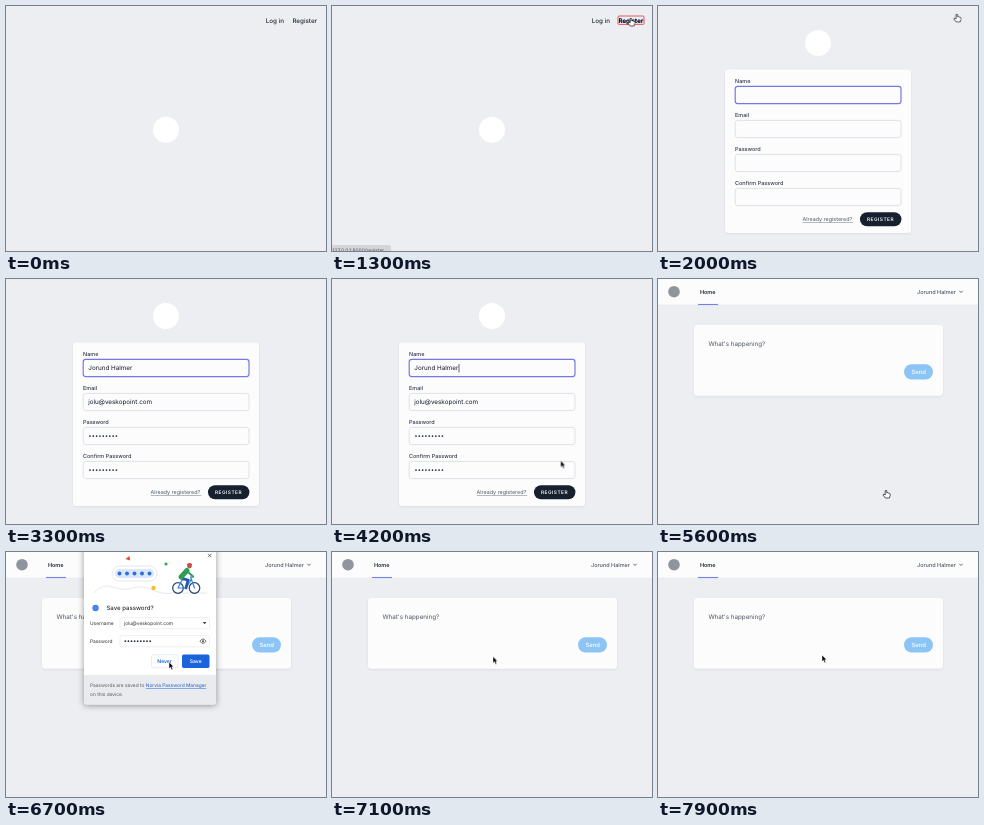
An HTML page that plays this animation: 320 by 245 pixels, repeating every 8 s.

```html
<!DOCTYPE html>
<html lang="en">
<head>
<meta charset="utf-8">
<title>Sign up</title>
<style>
html, body { margin: 0; width: 100%; height: 100%; overflow: hidden; background: #edeef2; }
svg { display: block; width: 320px; height: 245px; font-family: Inter, "Open Sans", sans-serif; fill: #1f2937; text-rendering: geometricPrecision; }

.semi { font-weight: 600; }
.medium { font-weight: 500; }
.nav { font-size: 6.25px; }
.label { font-size: 5.5px; font-weight: 500; fill: #303a49; }
.value { font-size: 6.3px; fill: #111827; }
.dialog-text { font-size: 4.85px; fill: #2c2f34; }
.surface { fill: #fcfcfd; }
.card { filter: drop-shadow(0 1px 1px #0001); }
.field { fill: #fcfcfd; stroke: #d3d7dd; stroke-width: .7; }
.dots { fill: none; stroke: #1f2937; stroke-width: 1.75; stroke-linecap: round; }

/* One loop is 8 s, so 1.25% is 100 ms. */
.cut, .fade, #pointer, #button { animation: 8s infinite both; }
.cut { animation-timing-function: step-end; }
.fade { animation-timing-function: linear; }

#welcome { animation-name: welcome; }
#register { animation-name: register; }
#home { animation-name: home; }
#ring { animation-name: ring; }
#status { animation-name: status; }
#first-caret { animation-name: first-caret; }
#caret { animation-name: caret; }
#filled { animation-name: filled; }
#button { animation-name: button; animation-timing-function: linear; }
#dialog { animation-name: dialog; }
#pointer { animation-name: move; animation-timing-function: ease-in-out; }
#shown { animation-name: shown; }
#arrow { animation-name: arrow; }
#hand { animation-name: hand; }

@keyframes welcome { 0% { opacity: 1 } 18.75%, 100% { opacity: 0 } }
@keyframes register { 0% { opacity: 0 } 18.75% { opacity: 1 } 66.25%, 100% { opacity: 0 } }
@keyframes home { 0% { opacity: 0 } 66.25%, 100% { opacity: 1 } }
@keyframes ring { 0% { opacity: 0 } 16.2%, 100% { opacity: 1 } }
@keyframes status { 0%, 14.5% { opacity: 0 } 16.25%, 100% { opacity: 1 } }
@keyframes first-caret { 0% { opacity: 1 } 25%, 100% { opacity: 0 } }
@keyframes caret {
  0% { opacity: 0 } 37.5% { opacity: 1 } 41.2% { opacity: 0 } 47.5% { opacity: 1 }
  53.75% { opacity: 0 } 60%, 100% { opacity: 1 }
}
@keyframes filled { 0% { opacity: 0 } 35%, 100% { opacity: 1 } }
@keyframes button { 0%, 58.75% { fill: #17202f } 60.6%, 100% { fill: #2c3545 } }
@keyframes dialog { 0%, 72% { opacity: 0 } 76.25%, 86% { opacity: 1 } 88.75%, 100% { opacity: 0 } }
@keyframes move {
  0%, 3.75% { transform: translate(220px, 213px) }
  13.75%, 23% { transform: translate(298.7px, 12px) }
  30%, 44% { transform: translate(299px, -12px) }
  44.1%, 45% { transform: translate(240px, 15px) }
  55%, 57.5% { transform: translate(227px, 206px) }
  58.75%, 78% { transform: translate(228px, 211px) }
  82.5%, 86.5% { transform: translate(163px, 110px) }
  88.75%, 98.65% { transform: translate(161px, 104.5px) }
  98.7%, 100% { transform: translate(164px, 103px) }
}
@keyframes shown { 0% { opacity: 0 } 3.75% { opacity: 1 } 30% { opacity: 0 } 45%, 100% { opacity: 1 } }
@keyframes arrow { 0% { opacity: 1 } 15% { opacity: 0 } 30% { opacity: 1 } 58.75% { opacity: 0 } 78.75%, 100% { opacity: 1 } }
@keyframes hand { 0% { opacity: 0 } 15% { opacity: 1 } 30% { opacity: 0 } 58.75% { opacity: 1 } 78.75%, 100% { opacity: 0 } }
</style>
</head>
<body>
<svg viewBox="0 0 320 245">
  <g id="welcome" class="cut">
    <g class="nav medium">
      <text x="259.8" y="16.5">Log in</text>
      <text x="286.4" y="16.5">Register</text>
    </g>
    <circle cx="160" cy="123.7" r="13" fill="#fff"/>
    <g id="ring" class="cut">
      <rect x="286" y="10" width="26" height="8.4" rx="1" fill="none" stroke="#e8474a" stroke-width=".9"/>
      <text class="nav semi" x="286.4" y="16.5" fill="#111827">Register</text>
    </g>
    <g id="status" class="fade">
      <path d="M0 239h57q2 0 2 2v4H0z" fill="#d3d5d8"/>
      <text x=".5" y="246" font-size="4.9" fill="#50555c">127.0.0.1:8000/register</text>
    </g>
  </g>

  <g id="register" class="cut">
    <circle cx="160" cy="37" r="13" fill="#fff"/>
    <rect class="surface card" x="67" y="63.5" width="186" height="163.5" rx="3.5"/>
    <g class="label">
      <text x="77" y="76.6">Name</text>
      <text x="77" y="110.6">Email</text>
      <text x="77" y="144.6">Password</text>
      <text x="77" y="178.6">Confirm Password</text>
    </g>
    <g class="field">
      <rect x="77.2" y="80.4" width="165.8" height="17.2" rx="2.5" style="stroke:#7577e6;stroke-width:1.2"/>
      <rect x="77.2" y="114.4" width="165.8" height="17.2" rx="2.5"/>
      <rect x="77.2" y="148.4" width="165.8" height="17.2" rx="2.5"/>
      <rect x="77.2" y="182.4" width="165.8" height="17.2" rx="2.5"/>
    </g>
    <path id="first-caret" class="cut" d="M82.6 85v8.5" stroke="#1f2937" stroke-width=".7"/>
    <g id="filled" class="cut">
      <g class="value">
        <text x="82.3" y="91.3">Jorund Halmer</text>
        <text x="82.3" y="125.3">jolu@veskopoint.com</text>
      </g>
      <path class="dots" stroke-dasharray="0 3.3" d="M84 157h26.6M84 191h26.6"/>
    </g>
    <path id="caret" class="cut" d="M127 85v8.5" stroke="#1f2937" stroke-width=".7"/>
    <text x="144.6" y="215.4" font-size="5.4" fill="#505866">Already registered?</text>
    <path d="M144.6 216.5h50.6" stroke="#6b7280" stroke-width=".5"/>
    <rect id="button" x="202" y="206.3" width="41.4" height="14" rx="7"/>
    <text class="semi" x="209" y="215.1" font-size="4.8" letter-spacing=".48" fill="#f5f6f8">REGISTER</text>
  </g>

  <g id="home" class="cut">
    <rect class="surface" width="320" height="26"/>
    <path d="M0 26h320" stroke="#e6e8ec" stroke-width=".6"/>
    <circle cx="16" cy="12.7" r="5.8" fill="#8f949d"/>
    <text class="semi" x="41.9" y="15" font-size="5.5">Home</text>
    <path d="M40 25.5h20" stroke="#7482e6" stroke-width="1.1"/>
    <text class="medium" x="259" y="14.6" font-size="5.5" fill="#4f5765">Jorund Halmer</text>
    <path d="M301.3 11.8l1.7 1.7 1.7-1.7" fill="none" stroke="#4f5765" stroke-width=".9"/>
    <rect class="surface card" x="36" y="46" width="249" height="70.8" rx="3.5"/>
    <text x="50.4" y="66.6" font-size="6.28" fill="#4c5563">What's happening?</text>
    <rect x="246" y="85.2" width="29" height="15.2" rx="7.6" fill="#8cc5f5"/>
    <text class="medium" x="253.4" y="95" font-size="5.9" fill="#fff">Send</text>
  </g>

  <g id="dialog" class="fade">
    <g style="filter:drop-shadow(0 1px 3px #0006)">
      <rect x="78" y="-8" width="132" height="160.5" rx="2.5" fill="#fff"/>
    </g>
    <path d="M78 123h132v27q0 2.5-2.5 2.5h-127q-2.5 0-2.5-2.5z" fill="#e9ebee"/>
    <path d="M202 1.8l3.4 3.4m0-3.4L202 5.2" stroke="#4b4f55" stroke-width=".8"/>

    <g fill="none" stroke="#dfe2e7" stroke-width=".8">
      <path d="M88 41q8-10 19-6t20 1 20 2 18 3h36"/>
      <path d="M151 15q6-7 15-4" stroke-dasharray="1 1"/>
      <rect x="106" y="14" width="45" height="15" rx="7.5" fill="#fff"/>
    </g>
    <rect x="109" y="17" width="39" height="9" rx="4.5" fill="#dbe7fc"/>
    <path class="dots" style="stroke:#2d6fe0;stroke-width:4" stroke-dasharray="0 7.5" d="M113.5 21.5h30.2"/>
    <path d="M119.5 7l4-3 .6 4.6z" fill="#df4538"/>
    <circle cx="147.5" cy="36" r="2.2" fill="#f7bd32"/>
    <circle cx="160" cy="12" r="1.6" fill="#35a45a"/>
    <g fill="none" stroke-linecap="round" stroke-linejoin="round">
      <g stroke="#24466f" stroke-width="1.2">
        <circle cx="172" cy="36" r="5.3"/>
        <circle cx="188.5" cy="36" r="5.3"/>
        <path d="M172 36l4-8h9l-5 8zM188.5 36l-4-11h3" stroke="#377fd8"/>
      </g>
      <path d="M175 26l7 2-2 8" stroke="#2459a8" stroke-width="2.8"/>
      <path d="M175 25l6-6.5" stroke="#2e9b56" stroke-width="5"/>
      <path d="M181 19l6 5.5" stroke="#2e9b56" stroke-width="2"/>
    </g>
    <circle cx="183.5" cy="14" r="2.4" fill="#a9604b"/>
    <path d="M180.8 13.2a2.8 2.8 0 0 1 5.5 0z" fill="#d94335"/>

    <circle cx="89.5" cy="56" r="3.2" fill="#4285f4"/>
    <text class="medium" x="100.4" y="58.2" font-size="6.05" fill="#2c2f34">Save password?</text>
    <g fill="#fff" stroke="#e2e5e9" stroke-width=".6">
      <rect x="114" y="65.6" width="89.5" height="11.2" rx="1.5"/>
      <rect x="114" y="83.6" width="89.5" height="11.2" rx="1.5"/>
    </g>
    <g class="dialog-text">
      <text x="84" y="73">Username</text>
      <text x="84" y="91">Password</text>
      <text x="118" y="73">jolu@veskopoint.com</text>
      <text x="84" y="135.2" style="fill:#565b62">Passwords are saved to
        <tspan fill="#1a5fd0" text-decoration="underline">Norvia Password Manager</tspan></text>
      <text x="84" y="143.6" style="fill:#565b62">on this device.</text>
    </g>
    <path class="dots" stroke-dasharray="0 3.1" d="M119.3 89.2h25"/>
    <path d="M196.6 70h4l-2 2.2z" fill="#43474d"/>
    <path d="M194 89.2q3-4.4 6 0-3 4.4-6 0z" fill="none" stroke="#43474d" stroke-width=".8"/>
    <circle cx="197" cy="89.2" r="1" fill="#43474d"/>
    <rect x="145.5" y="102.8" width="26.5" height="13" rx="1.8" fill="#fff" stroke="#dbe4f5" stroke-width=".7"/>
    <rect x="176" y="102.5" width="27.5" height="13.5" rx="1.8" fill="#1a63db"/>
    <g class="semi" font-size="5" text-anchor="middle">
      <text x="158.6" y="111" fill="#1a63db">Never</text>
      <text x="189.7" y="111" fill="#fff">Save</text>
    </g>
  </g>

  <g id="pointer">
    <g id="shown" class="cut" stroke-linejoin="round">
      <path id="arrow" class="cut" d="M0 0v6.6l1.5-1.3 1.1 2.5 1.2-.5-1.1-2.5h2z" fill="#000" stroke="#fff" stroke-width=".5"/>
      <path id="hand" class="cut" d="M-.8 5V.7q.8-1 1.6 0V3q.8-.6 1.4.1.8-.4 1.2.3.8-.2.8.7V5.5L3.3 8H-.6L-3 5q.3-1.2 1.3-.6z" fill="#fff" stroke="#111" stroke-width=".7"/>
    </g>
  </g>
</svg>
</body>
</html>
```
